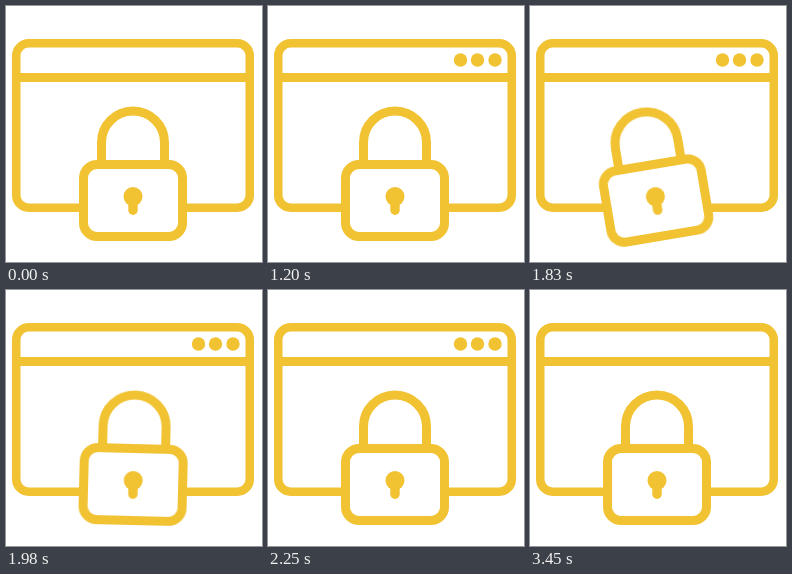
Write an HTML page without scripts that moves like this. It is 256x256 px and loops after 3.6 s.

```html
<!DOCTYPE html>
<html lang="en">
<head>
<meta charset="utf-8">
<title>Locked window</title>
<style>
  html, body { margin: 0; width: 100%; height: 100%; overflow: hidden; background: #fff; }
  svg { display: block; width: 100%; height: 100%; }
  .line { fill: none; stroke: #f1c232; stroke-width: 9; }
  .solid { fill: #f1c232; }
  .body { fill: #fff; }

  .dot {
    transform-box: fill-box;
    transform-origin: center;
    animation: dot 3600ms cubic-bezier(.33, 0, .67, 1) var(--wait) infinite backwards;
  }
  .lock {
    transform-origin: 127px 200px;
    animation: shake 3600ms cubic-bezier(.33, 0, .67, 1) infinite;
  }

  /* in 330-660 ms, out 2550-2910 ms, plus each dot's wait */
  @keyframes dot {
    0%, 9.1667% { transform: scale(0); }
    18.3333%, 70.8333% { transform: scale(1); }
    80.8333%, 100% { transform: scale(0); }
  }
  /* 1500, 1800, 2130, 2250 ms */
  @keyframes shake {
    0%, 41.6667% { transform: rotate(0deg); }
    50% { transform: rotate(-10deg); }
    59.1667% { transform: rotate(10deg); }
    62.5%, 100% { transform: rotate(0deg); }
  }
</style>
</head>
<body>
<svg viewBox="0 0 256 256">
  <rect class="line" x="10.25" y="37.25" width="233.5" height="164.5" rx="12.5" style="stroke-width: 8.5"/>
  <path class="line" d="M10 71.5H244"/>

  <circle class="solid dot" cx="227" cy="54" r="6.7" style="--wait: 0ms"/>
  <circle class="solid dot" cx="209.5" cy="54" r="6.7" style="--wait: 270ms"/>
  <circle class="solid dot" cx="192.5" cy="54" r="6.7" style="--wait: 540ms"/>

  <g class="lock">
    <path class="line" d="M95.5 158V136.5a31.5 31.5 0 0 1 63 0V158"/>
    <rect class="line body" x="77.5" y="158.5" width="99" height="72" rx="13.5"/>
    <circle class="solid" cx="127" cy="190.5" r="9.5"/>
    <rect class="solid" x="122.3" y="190" width="9.4" height="19" rx="4.7"/>
  </g>
</svg>
</body>
</html>
```
